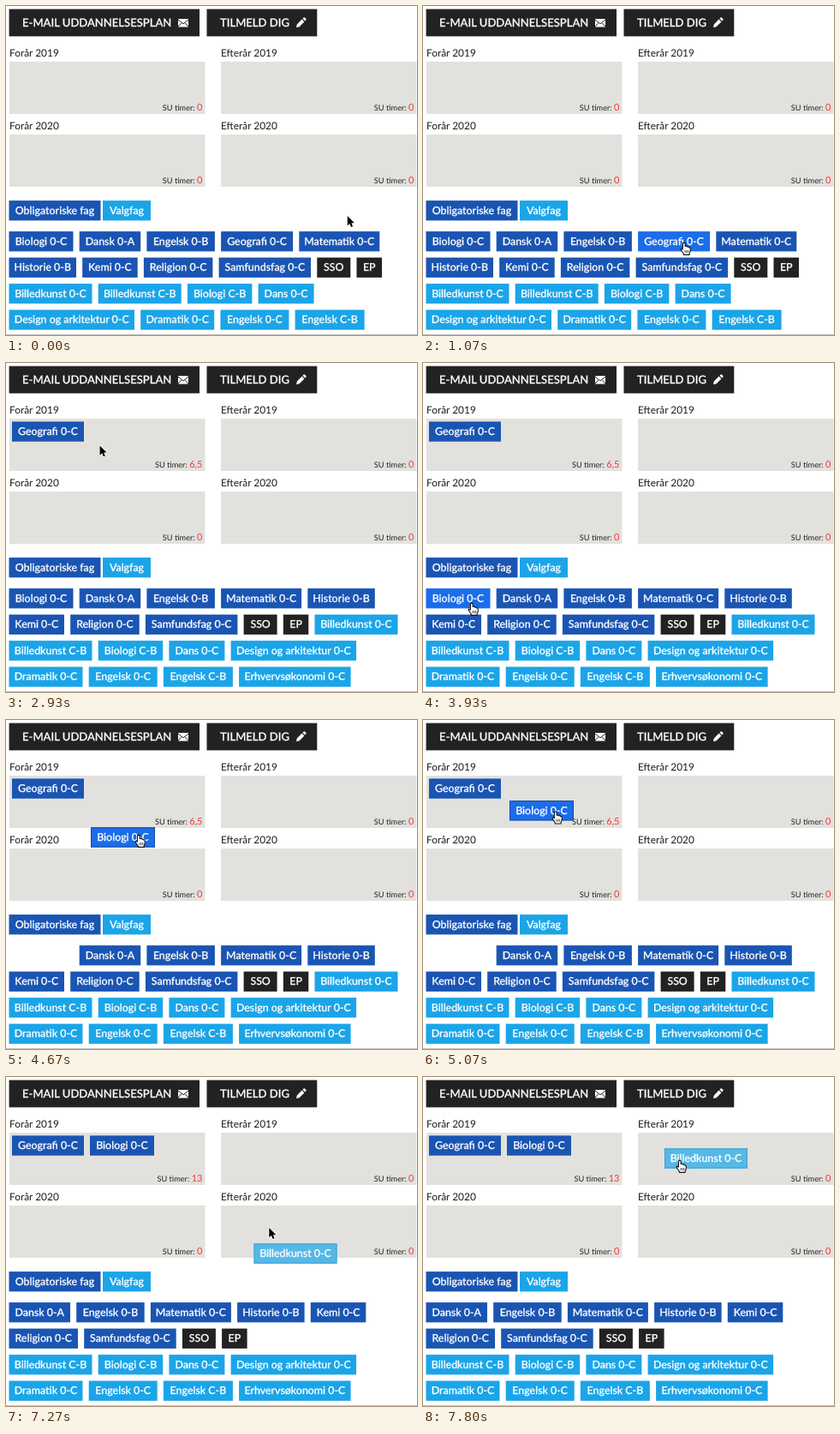
Recreate the animation shown at these times as an HTML page with a canvas. Size 480 by 384 pixels, loop 8000 ms.

```html
<!DOCTYPE html>
<html lang="da">
<head>
<meta charset="utf-8">
<title>Uddannelsesplan</title>
<style>
  html, body { margin: 0; width: 100%; height: 100%; overflow: hidden; background: #fff; }
  canvas { display: block; width: 480px; height: 384px; }
</style>
</head>
<body>
<canvas id="stage"></canvas>
<script>
const LOOP = 8000, STEP = 200 / 3;
const W = 480, H = 384;
const canvas = document.getElementById('stage');
const ctx = canvas.getContext('2d');
const dpr = window.devicePixelRatio || 1;
canvas.width = W * dpr;
canvas.height = H * dpr;
ctx.textRendering = 'geometricPrecision';

const FONT = 'Lato, "Open Sans", sans-serif';
const DARK = '#222222', PANEL = '#e2e1dd', RED = '#f2383c';
const KINDS = {
  must: { base: '#1a55b3', hot: '#1b6dea', edge: '#174a94' },
  pick: { base: '#1ba5e8', hot: '#56b8e7', edge: '#3c9fd2' },
  dark: { base: DARK, hot: '#3a3a3a', edge: '#111111' }
};

const course = (kind, list) => list.map(([name, w]) => ({ name, w, kind: KINDS[kind] }));
const COURSES = [
  ...course('must', [['Biologi 0-C', 75], ['Dansk 0-A', 71.5], ['Engelsk 0-B', 79.5],
    ['Geografi 0-C', 84], ['Matematik 0-C', 94], ['Historie 0-B', 78.5], ['Kemi 0-C', 64.5],
    ['Religion 0-C', 80.5], ['Samfundsfag 0-C', 107.5]]),
  ...course('dark', [['SSO', 39], ['EP', 29.5]]),
  ...course('pick', [['Billedkunst 0-C', 97], ['Billedkunst C-B', 97], ['Biologi C-B', 75.5],
    ['Dans 0-C', 65], ['Design og arkitektur 0-C', 146.5], ['Dramatik 0-C', 86],
    ['Engelsk 0-C', 80], ['Engelsk C-B', 81], ['Erhvervsøkonomi 0-C', 130.5]])
];
const TAG_H = 23.3, GAP = 7.2, LEFT = 3.5, TOP = 263.1, PITCH = 30.5, ROWS = 4;

// Times are counted in steps of 1/15 s; dx, dy is where the pointer grips the tag.
const DRAGS = [
  { name: 'Geografi 0-C', press: 19, lift: 19, drop: 31, dx: 53, dy: 12, to: [7, 68.4] },
  { name: 'Biologi 0-C', press: 67, lift: 67, drop: 79, dx: 53, dy: 15.7, to: [98, 68.4] },
  { name: 'Billedkunst 0-C', press: 105, lift: 108, drop: 999, dx: 17, dy: 12.6 }
];
const HOURS = ['0', '6,5', '13'];

const PATH = [
  [0, 398, 244], [8, 304, 275], [18, 304, 275], [20, 250, 215], [22, 168, 116],
  [23, 141, 94], [24, 141, 88], [30, 110, 91], [43, 110, 91], [54, 56, 279],
  [66, 56, 279], [67, 75, 250], [68, 125, 185], [69, 152, 141], [70, 154, 133],
  [77, 154, 104], [87, 154, 104], [92, 293.5, 226], [100, 306.5, 305], [107, 306.5, 305],
  [108, 306.5, 207], [109, 306.5, 175], [111, 304, 140], [114, 300, 108],
  [116, 299, 96], [120, 299, 96]
];

const ARROW = new Path2D('M0 0V12.6L2.9 9.9L4.8 14.4L7 13.5L5.1 9.1H9Z');
const HAND = new Path2D('M-1.4 1Q0-.7 1.4 1L1.6 5Q3.2 4.2 4 5.6Q5.8 5 6.3 6.5Q8 6.2 8.3 8' +
  'L8.2 11Q7.8 13 7 14.4V16H-.5L-.8 14Q-3.5 11-4.3 8.6Q-3.6 7.2-1.6 9Z');

function pointer(n) {
  const i = Math.max(1, PATH.findIndex(p => p[0] >= n));
  const [t0, x0, y0] = PATH[i - 1], [t1, x1, y1] = PATH[i];
  let u = Math.max(0, (n - t0) / (t1 - t0));
  if (t1 - t0 > 5) u = u * u * (3 - 2 * u);
  return [x0 + (x1 - x0) * u, y0 + (y1 - y0) * u];
}

function rect(x, y, w, h, fill) {
  ctx.fillStyle = fill;
  ctx.fillRect(x, y, w, h);
}

// bold thickens the strokes slightly without changing the letter widths
function text(str, x, y, size, fill, align = 'left', bold = false) {
  ctx.font = `${bold ? 500 : 400} ${size}px ${FONT}`;
  ctx.fillStyle = ctx.strokeStyle = fill;
  ctx.textAlign = align;
  ctx.fillText(str, x, y);
  if (bold) {
    ctx.lineWidth = .25;
    ctx.strokeText(str, x, y);
  }
  return ctx.measureText(str).width;
}

function header() {
  rect(3.6, 3.6, 222.4, 31.8, DARK);
  text('E-MAIL UDDANNELSESPLAN', 19, 24, 13.05, '#fff', 'left', true);
  rect(201, 15, 12, 9.5, '#fff');
  ctx.strokeStyle = DARK;
  ctx.lineWidth = 1;
  ctx.stroke(new Path2D('M201 16L207 20.8L213 16M201 24L205 19.6M213 24L209 19.6'));

  rect(234.5, 3.6, 128.8, 31.8, DARK);
  text('TILMELD DIG', 250, 24, 13.05, '#fff', 'left', true);
  ctx.fillStyle = '#fff';
  ctx.fill(new Path2D('M339 25L339.8 21.4L345.6 15.6L348.4 18.4L342.6 24.2Z' +
    'M346.4 14.8L347.7 13.5Q348.3 13 349 13.6L350.4 15Q351 15.7 350.4 16.3L349.2 17.6Z'));
}

function panel(x, y, title, hours) {
  text(title, x, y - 6, 11.9, '#1c1c1c');
  rect(x, y, 228.5, 61, PANEL);
  const right = x + 225.5;
  const w = text(hours, right, y + 57, 11, RED, 'right');
  text('SU timer:', right - w - 2.5, y + 57, 9.2, '#222', 'right');
}

function tag({ name, w, kind }, x, y, hot, edge) {
  rect(x, y, w, TAG_H, hot ? kind.hot : kind.base);
  if (edge) {
    ctx.strokeStyle = kind.edge;
    ctx.lineWidth = 1;
    ctx.strokeRect(x + .5, y + .5, w - 1, TAG_H - 1);
  }
  text(name, x + w / 2, y + 15.8, 12.4, '#fff', 'center', true);
}

function layout(n) {
  const tags = [];
  let x = LEFT, row = 0;
  for (const c of COURSES) {
    const drag = DRAGS.find(d => d.name === c.name);
    if (drag && n >= drag.drop) {
      tags.push({ c, x: drag.to[0], y: drag.to[1] });
      continue;
    }
    if (x + c.w > 477) { x = LEFT; row++; }
    if (row >= ROWS) break;
    const item = { c, x, y: TOP + row * PITCH };
    if (drag && n >= drag.press) item.pressed = true;
    if (drag && n >= drag.lift) {
      // a carried tag trails the pointer by one step
      const [px, py] = pointer(n - 1);
      item.x = px - drag.dx;
      item.y = py - drag.dy;
      item.held = true;
    }
    tags.push(item);
    x += c.w + GAP;
  }
  return tags.sort((a, b) => !!a.held - !!b.held);
}

function drawPointer(x, y, hand) {
  ctx.save();
  ctx.translate(x + .8, y + 1);
  ctx.scale(.9, .9);
  ctx.lineJoin = 'round';
  const shape = hand ? HAND : ARROW;
  ctx.strokeStyle = hand ? '#111' : '#fff';
  ctx.lineWidth = hand ? 1.2 : 1.8;
  ctx.fillStyle = hand ? '#fff' : '#000';
  if (hand) ctx.fill(shape);
  ctx.stroke(shape);
  if (!hand) ctx.fill(shape);
  if (hand) {
    ctx.lineWidth = .8;
    ctx.stroke(new Path2D('M1.4 10V13.5M3.4 10V13.5M5.4 10V13.5'));
  }
  ctx.restore();
}

function draw(n) {
  ctx.setTransform(dpr, 0, 0, dpr, 0, 0);
  rect(0, 0, W, H, '#fff');
  header();

  const done = DRAGS.filter(d => n >= d.drop).length;
  panel(4, 65, 'Forår 2019', HOURS[done]);
  panel(251, 65, 'Efterår 2019', '0');
  panel(4, 150, 'Forår 2020', '0');
  panel(251, 150, 'Efterår 2020', '0');

  tag({ name: 'Obligatoriske fag', w: 107, kind: KINDS.must }, LEFT, 227.1);
  tag({ name: 'Valgfag', w: 56, kind: KINDS.pick }, 113, 227.1);

  const [px, py] = pointer(n);
  let over = false;
  for (const { c, x, y, held, pressed } of layout(n)) {
    const inside = px >= x && px <= x + c.w && py >= y && py <= y + TAG_H;
    over = over || inside;
    tag(c, x, y, inside || held, pressed);
  }
  rect(0, 383, W, 1, '#c4c4c4');
  drawPointer(px, py, over);
}

const start = performance.now();
function tick() {
  const t = (performance.now() - start) % LOOP;
  draw(Math.floor((t + 5) / STEP));
  requestAnimationFrame(tick);
}
tick();
</script>
</body>
</html>
```
